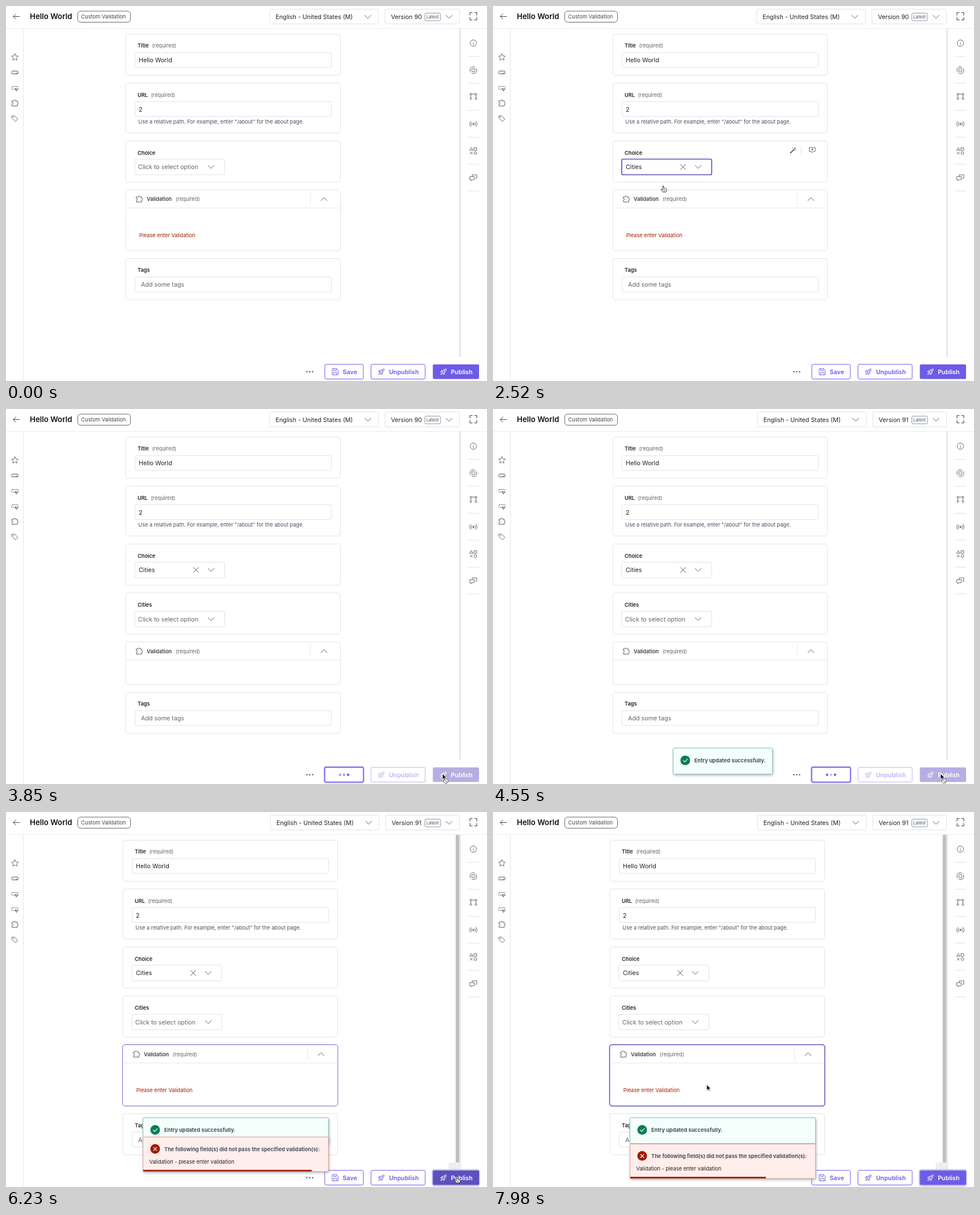
An HTML page that plays this animation: 848 px wide and 660 px high, repeating every 8 s.

```html
<!DOCTYPE html>
<html lang="en">
<head>
<meta charset="utf-8">
<title>Entry editor</title>
<style>
html, body { margin: 0; width: 100%; height: 100%; overflow: hidden; background: #fff; }
svg { display: block; width: 848px; height: 660px; font-family: Inter, "Liberation Sans", sans-serif; }
text { white-space: pre; }
.toast { filter: drop-shadow(1px 2.5px 2px #5c6f8480); }
</style>
</head>
<body>
<svg id="stage" viewBox="0 0 848 660" fill="none"></svg>
<script>
const INK = '#222', GREY = '#646468', ICON = '#555963', LINE = '#dfe2e8',
      PURPLE = '#6c5ce7', DEEP = '#5d50be', RED = '#a31b00', GREEN = '#087c56';
const LOOP = 8000, STEP = 70;

// ---- markup helpers ----
const text = (x, y, s, size = 9.2, fill = INK, weight = 400, id = '') =>
  `<text ${id && `id="${id}"`} x="${x}" y="${y}" font-size="${size}" font-weight="${weight}" fill="${fill}">${s}</text>`;
const box = (x, y, x2, y2, r = 2, stroke = LINE, fill = '#fff', more = '') =>
  `<rect x="${x}" y="${y}" width="${x2 - x}" height="${y2 - y}" rx="${r}" stroke="${stroke}" fill="${fill}" ${more}/>`;
const path = (d, stroke = ICON, w = .9, more = '') =>
  `<path d="${d}" stroke="${stroke}" stroke-width="${w}" stroke-linecap="round" stroke-linejoin="round" ${more}/>`;
const at = (x, y, s, id = '') => `<g ${id && `id="${id}"`} transform="translate(${x} ${y})">${s}</g>`;
const group = (id, s) => `<g id="${id}">${s}</g>`;
const dot = (x, y, r, fill) => `<circle cx="${x}" cy="${y}" r="${r}" fill="${fill}"/>`;
const ring = (x, y, r, stroke = ICON) => `<circle cx="${x}" cy="${y}" r="${r}" stroke="${stroke}" stroke-width=".9"/>`;
const chevron = (x, y, up = 1) => path(`M${x - 5.3} ${y - 2.7 * up}l5.3 ${5.3 * up} 5.3 ${-5.3 * up}`, '#4a4a4e');
const card = (y, y2) => box(211, y, 589.5, y2, 4.5);
const label = (y, s, req) => text(232, y, s, 9.2, INK, 600) + (req ? text(req, y, '(required)', 9.2, GREY) : '');
const input = (y, s, x = 234, fill = INK) => box(227.5, y, 573.5, y + 26) + text(x, y + 17.3, s, 10.74, fill);

// ---- icons, each centred on 0,0 ----
const puzzle = path('M-5-4h2.8a1.6 1.6 0 0 1 3.2 0h3.2v2.8a1.6 1.6 0 0 1 0 3.2v3h-9.2v-3a1.6 1.6 0 0 0 0-3.2z', ICON, 1);
const star = path('M0-6l1.8 3.8 4.1.5-3 2.9.8 4.1L0 3.3l-3.7 2 .8-4.1-3-2.9 4.1-.5z');
const field = box(-5.5, -2.5, 5.5, 2.5, 1, ICON, 'none') + path('M2 1h2');
const picker = box(-5.5, -3.5, 5.5, 1.5, 1, ICON, 'none', 'stroke-dasharray="2 1"') + path('M1 0l4.5 1.8-2 .8-.8 2z', ICON, 1, 'fill="#fff"');
const tag = path('M-5-4.8h4.3L5.2 1 .8 5.2-5-.7z') + ring(-2.5, -2.4, .5);
const info = ring(0, 0, 5.6) + path('M0-.3v3M0-2.6v.2');
const target = ring(0, 0, 3.1) + path('M-5.6 2.4A6 6 0 0 1 2.4-5.6M5.6-2.4A6 6 0 0 1-2.4 5.6M4.3-4.3l.3.3M-4.3 4.3l-.3-.3');
const nodes = [[-4.5, -4], [4.5, -4], [-4.5, 4], [4.5, 4]].map(p => ring(...p, 1.5)).join('') + path('M-3-4h6M-4.5-2.5v5M4.5-2.5v5');
const signal = dot(0, 0, 1.6, ICON) + path('M-2.6-3a4 4 0 0 0 0 6M2.6-3a4 4 0 0 1 0 6M-4.7-4.6a6.6 6.6 0 0 0 0 9.2M4.7-4.6a6.6 6.6 0 0 1 0 9.2');
const shapes = path('M-3.5-6l2.7 4.6h-5.4zM1.3-5.8h4.6v4.6h-4.6zM-5.6 1.6l4 4M-1.6 1.6l-4 4') + ring(3.6, 3.6, 2.4);
const chat = path('M-2-1.8v-3.4h8v6h-2') + path('M-6-2h7.5v5.4h-4l-1.7 2v-2h-1.8z');
const comment = path('M-5-4.5h10v7h-3.4L0 4.6-1.6 2.5H-5zM0-2.8v3.4M-1.7-1.1h3.4');
const wand = path('M-4.5 4.6L1.5-1.4', ICON, 1.9) + path('M2.4-4.8v2M4.8-2h-2M4.4-4.4l-1 1M-.8-4l.7.9M4 .8l-.8-.8');
const rocket = c => path('M-2.3.3C-1.4-3 1-4.8 4.8-4.9 4.7-1.1 2.9 1.3-.4 2.2zM-1.5-1.9l-2.4.2-1.4 2.2 2.9.1M1.8 1.4l-.1 2.5-2.2 1.3-.2-2.9M-3.1 2.2q-1.7.4-1.9 2.7 2.2-.1 2.7-1.8', c) + ring(1.6, -1.7, 1, c);
const disk = path('M-5-5.5h7.5L5-3v8.5H-5zM-2.7-5.2v3h4.5v-3M-2.7 5.2V1h5.4v4.2', PURPLE);

const stack = (x, items) => items.map(([y, s]) => at(x, y, s)).join('');
const page = [
  // form
  group('form',
    card(49.5, 122) + label(73.3, 'Title', 257.5) + input(82, 'Hello World') +
    card(135.5, 223.5) + label(159.5, 'URL', 255.5) + input(168.3, '2') +
    text(233.3, 207, 'Use a relative path. For example, enter "/about" for the about page.', 9.2, '#475161') +
    box(211, 237.5, 589.5, 310, 4.5, LINE, '#fff', 'id="choice"') + label(261.6, 'Choice') +
    box(227, 269.5, 385.5, 297, 2, LINE, '#fff', 'id="select"') + chevron(361.7, 283.3) +
    text(232.8, 287.3, 'Click to select option', 10.74, GREY, 400, 'hint') +
    group('value', text(234, 287.3, 'Cities', 10.74) + path('M330.5 278.8l9 9M339.5 278.8l-9 9', '#3f434b')) +
    group('cities', card(323.7, 396.3) + label(348, 'Cities') + box(227, 356, 385.5, 383.3) +
      text(232.8, 373.8, 'Click to select option', 10.74, GREY) + chevron(361.7, 369.8)) +
    group('val', box(211, 323.7, 589.5, 430.5, 4.5, LINE, '#fff', 'id="frame"') +
      path('M211.5 355.5h377.5M536.5 330v20.5', '#e6e8ed', 1) + at(235, 340, puzzle) +
      text(248, 343.3, 'Validation', 9.2, '#3c414b', 600) + text(299, 343.3, '(required)', 9.2, GREY) +
      chevron(560.5, 339.8, -1) +
      group('bones', [375.5, 395.3].map(y => `<rect x="228.5" y="${y}" width="197" height="6.5" rx="3" fill="#edf1f7"/>`).join('')) +
      text(234.8, 407.2, 'Please enter Validation', 9.2, RED, 400, 'error')) +
    group('tags', card(444.5, 517) + label(468.4, 'Tags') + input(477, 'Add some tags', 238, GREY)) +
    group('tools', group('magic', at(529, 254, wand) + path('M543 246.5v15', LINE, 1)) + at(563, 253.5, comment)) +
    group('menu', box(227, 300.5, 385.5, 331, 2, LINE, '#fff', 'style="filter:drop-shadow(0 2px 4px #0002)"') + text(234, 319.6, 'Cities', 10.74))
  ),
  // scrollbar and footer
  group('scroll', path('M791.5 40v577', '#ececef', 1) + '<rect id="thumb" x="793" y="40" width="6" rx="2" fill="#bfbfbf"/>'),
  '<path d="M517 617h331v43H517z" fill="#fff"/>',
  path('M800.5 40v577', '#c8cbd1', 1.2),
  '<path id="corner" d="M780.5 617h22.5v13h-22.5z" fill="#efeff0"/>',
  [530.5, 535.5, 540.5].map(x => dot(x, 643.7, 1.15, '#333')).join(''),
  box(560.7, 629.2, 631, 658, 3.5, '#b9b1f2', 'none', 'id="saveRing" stroke-width="1.4"'),
  box(562, 630.7, 630, 656.5, 2.5, PURPLE, '#fff', 'id="saveBox"'),
  group('save', at(580.5, 643.7, disk) + text(593.6, 647.6, 'Save', 10.74, PURPLE, 600)),
  group('dots', [589, 596, 603].map(x => dot(x, 643.7, 2.2, PURPLE)).join('')),
  group('unpub', box(643.5, 630.7, 739, 656.5, 2.5, PURPLE) + at(662, 643.7, rocket(PURPLE) + path('M-5-3l1.5 1.5', PURPLE)) +
    text(675.2, 647.6, 'Unpublish', 10.74, PURPLE, 600)),
  box(751.5, 629.5, 834.8, 657.7, 3.5, '#b9b1f2', 'none', 'id="pubRing" stroke-width="1.4"'),
  group('pub', box(752.5, 630.7, 834, 656.5, 2.5, 'none', PURPLE, 'id="pubBox"') + at(771.5, 643.7, rocket('#fff')) +
    text(784.2, 647.6, 'Publish', 10.74, '#fff', 600)),
  // rails
  path('M30.5 40v620', '#e6e7ec', 1),
  stack(15.7, [[90, star], [117, field], [145, picker]]),
  at(15.7, 172, picker, 'extra'),
  group('rail', stack(15.7, [[171, puzzle], [198, tag]])),
  stack(824, [[65.3, info], [113, target], [159, nodes], [207.5, signal], [255.3, shapes], [302.3, chat]]),
  [88.5, 136, 183.5, 231, 278.5, 325.5].map(y => path(`M814.5 ${y}h19`, LINE, 1)).join(''),
  // header
  '<path d="M0 0h848v39H0z" fill="#fff"/>', path('M0 39.5h848', '#ebecf0', 1),
  path('M13 18.5h11M17.5 14l-4.7 4.5 4.7 4.5', '#3f434b', 1),
  text(42, 23.3, 'Hello World', 13.3, '#111', 600),
  box(126.5, 9, 219.5, 28.5, 5, '#666') + text(132.6, 22.3, 'Custom Validation', 9.2, '#3f434b'),
  group('lang', box(465, 5.5, 656.7, 31.5) + text(475.3, 23, 'English - United States (M)', 10.74) + chevron(638, 19)),
  box(668, 5.5, 799.5, 31.5, 2, LINE, '#fff', 'id="verBox"'),
  text(678.7, 23, 'Version 90', 10.74, INK, 400, 'ver'),
  box(738.5, 12.5, 766, 26, 2, '#8d96a5') + text(741, 22, 'Latest', 7.67, '#475161'), chevron(781, 19),
  path('M818 16v-4.5h4M826 11.5h4V16M830 20v4.5h-4M822 24.5h-4V20', '#3f434b', 1.1),
  // toasts
  group('ok', '<rect id="okBox" class="toast" y="0" height="45.5" rx="2" fill="#f4fefb" stroke="#8cbfb9"/>' +
    group('okText', dot(21.5, 21.5, 8.5, GREEN) + path('M18 21.7l2.6 2.6 4.6-5', '#fff', 1.2) +
      text(37.4, 25, 'Entry updated successfully.', 9.2, '#475161', 700))),
  group('bad', box(241.5, 584.3, 568.5, 645, 2, '#dfa39b', '#ffeeeb', 'class="toast"') +
    dot(263, 605.3, 8.5, RED) + path('M260.3 602.6l5.4 5.4M265.7 602.6l-5.4 5.4', '#fff', 1.3) +
    text(279, 609.2, 'The following field(s) did not pass the specified validation(s):', 9.2, '#475161', 700) +
    text(252.6, 631.2, 'Validation - please enter validation') +
    `<rect id="bar" x="242" y="642" height="2.8" fill="${RED}"/>`),
  // pointer
  group('mouse',
    group('arrow', path('M0 0v10l2.3-2.1 1.6 3.6 1.8-.8-1.6-3.5h3.2z', '#fff', .9, 'fill="#111"')) +
    group('hand', path('M-.9.6Q0-.7 1 .6v3.6q1.2-.6 1.7.4 1.2-.5 1.7.5 1.6-.2 1.6 1.2v2q-.2 1.3-1 2.7H-.4L-3.8 6.6q.4-1.6 2.9.2z', '#222', .9, 'fill="#fff"') + path('M1.2 7v2M3 7v2', '#222', .7)) +
    group('ban', '<circle cx="6.2" cy="12.6" r="4" fill="#fff" stroke="#777" stroke-width="1.2"/>' + path('M3.5 9.9l5.4 5.4', '#777', 1.2)))
];
const stage = document.getElementById('stage');
stage.innerHTML = page.join('');

// ---- motion ----
const el = {};
stage.querySelectorAll('[id]').forEach(e => el[e.id] = e);
const show = (id, on) => el[id].style.display = on ? '' : 'none';
const set = (id, props) => { for (const k in props) el[id].setAttribute(k, props[k]); };
const move = (id, x, y) => set(id, { transform: `translate(${x} ${y})` });
const within = (t, a, b) => t >= a && t < b;
const clamp = (v, a = 0, b = 1) => Math.min(b, Math.max(a, v));

// time, x, y of the pointer tip
const PATH = [[70, 815, 650], [350, 480, 560], [630, 133, 350], [840, 214, 319], [1050, 311, 289],
  [1890, 311, 289], [2240, 300, 315], [2660, 300, 317], [2870, 415, 400], [3080, 620, 612],
  [3220, 600, 643], [3570, 600, 643], [3920, 789, 642], [4550, 789, 642], [5040, 794.5, 642],
  [6300, 794.5, 642], [6650, 777, 626], [6860, 572, 470], [7210, 440, 212], [7700, 379, 430], [7980, 376.7, 480]];
const KINDS = [[0, ''], [70, 'arrow'], [1050, 'hand'], [2700, 'arrow'], [3220, 'hand'], [3850, 'ban'], [4900, 'hand'], [6450, 'arrow']];

function pointer(t) {
  const i = PATH.findIndex(p => p[0] > t);
  if (i === 0) return PATH[0].slice(1);
  if (i < 0) return PATH[PATH.length - 1].slice(1);
  const [a, b] = [PATH[i - 1], PATH[i]], k = (t - a[0]) / (b[0] - a[0]), e = k * k * (3 - 2 * k);
  return [1, 2].map(n => a[n] + (b[n] - a[n]) * e);
}

// toast rise: fast entry from below, then a damped bounce over 700 ms
const BOUNCE = [[0, 3000], [.6, -20], [.75, 10], [.9, -5], [1, 0]];
function bounce(ms) {
  const k = clamp(ms / 700), i = Math.max(1, BOUNCE.findIndex(p => p[0] >= k));
  const [a, b] = [BOUNCE[i - 1], BOUNCE[i]], e = 1 - (1 - (k - a[0]) / (b[0] - a[0])) ** 3;
  return a[1] + (b[1] - a[1]) * e;
}

function draw(t) {
  const added = t >= 2940, loading = within(t, 2940, 3360), clean = within(t, 3640, 6090);
  const scroll = added && !clean, active = within(t, 2940, 3640);
  const [x, y] = pointer(t);

  // form layout
  move('form', scroll ? -5 : 0, 0);
  show('cities', added);
  show('extra', added);
  move('rail', 0, added ? 27 : 0);
  move('val', 0, added ? 86.3 : 0);
  move('tags', 0, !added ? 0 : loading ? 232 : clean ? 54 : 86.3);
  show('bones', loading);
  show('error', !clean);
  move('error', 0, loading ? 146 : 0);

  // validation card: the focused outline sits half a pixel outside
  const focused = t >= 5740, strong = t >= 6930, grow = focused ? .5 : 0;
  set('frame', { x: 211 - grow, y: 323.7 - grow, width: 378.5 + 2 * grow,
    height: (loading ? 253 : clean ? 75 : 107) + 2 * grow,
    stroke: strong ? DEEP : focused || loading ? '#7468cf' : LINE, 'stroke-width': strong ? 1.5 : 1 });
  show('scroll', scroll);
  set('thumb', { height: loading ? 494 : 577 });
  show('corner', t >= 6160);

  // choice field
  const focus = within(t, 1540, 3600), chosen = t >= 2520;
  set('select', { stroke: focus ? DEEP : LINE, 'stroke-width': focus ? 1.7 : 1 });
  el.choice.style.filter = active ? 'drop-shadow(0 3px 6px #5c648038)' : '';
  show('hint', !chosen);
  show('value', chosen);
  show('menu', within(t, 1890, 2520));
  const late = t >= 6860 && x < 585, onChoice = late && within(y, 237, 310), onCities = late && within(y, 324, 396);
  show('tools', within(t, 1050, 3640) || onChoice || onCities);
  show('magic', !active);
  move('tools', 0, onCities ? 86.3 : 0);

  // buttons
  const busy = within(t, 3640, 4900);
  const dim = busy ? .45 : within(t, 4900, 5040) ? .45 + .55 * (t - 4900) / 140 : 1;
  const saveFocus = within(t, 3570, 5530);
  show('save', !busy);
  show('dots', busy);
  [...el.dots.children].forEach((d, i) => d.setAttribute('opacity', .7 + .3 * Math.cos((t - 4550) / 140 + (i - 1) * 2.4 + Math.PI)));
  show('saveRing', saveFocus);
  set('saveBox', { 'stroke-width': saveFocus ? 1.5 : 1 });
  set('unpub', { opacity: dim });
  set('pub', { opacity: dim });
  show('pubRing', t >= 5600);
  set('pubBox', { fill: within(t, 70, 210) || within(t, 3850, 6720) ? DEEP : PURPLE });

  // header
  const saved = t >= 4200;
  move('lang', saved ? 1.4 : 0, 0);
  set('verBox', { x: saved ? 669.3 : 668, width: saved ? 130.2 : 131.5 });
  set('ver', { x: saved ? 680 : 678.7 });
  el.ver.textContent = saved ? 'Version 91' : 'Version 90';

  // toasts
  const wide = t >= 5800, left = wide ? 241.5 : 317.5;
  show('ok', t >= 3900);
  move('ok', 0, wide ? 538 : 598.7 + bounce(t - 3900));
  set('okBox', { x: left, width: wide ? 327 : 175 });
  move('okText', left, 0);
  show('bad', wide);
  move('bad', 0, bounce(t - 5800));
  set('bar', { width: 283 - (t - 6650) * .0331 });

  // pointer
  const kind = KINDS.filter(k => k[0] <= t).pop()[1];
  move('mouse', x, y);
  show('arrow', kind === 'arrow' || kind === 'ban');
  show('hand', kind === 'hand');
  show('ban', kind === 'ban');
}

function tick() {
  const t = performance.now() % LOOP;
  draw(Math.floor(t / STEP) * STEP);
  requestAnimationFrame(tick);
}
tick();
</script>
</body>
</html>
```
